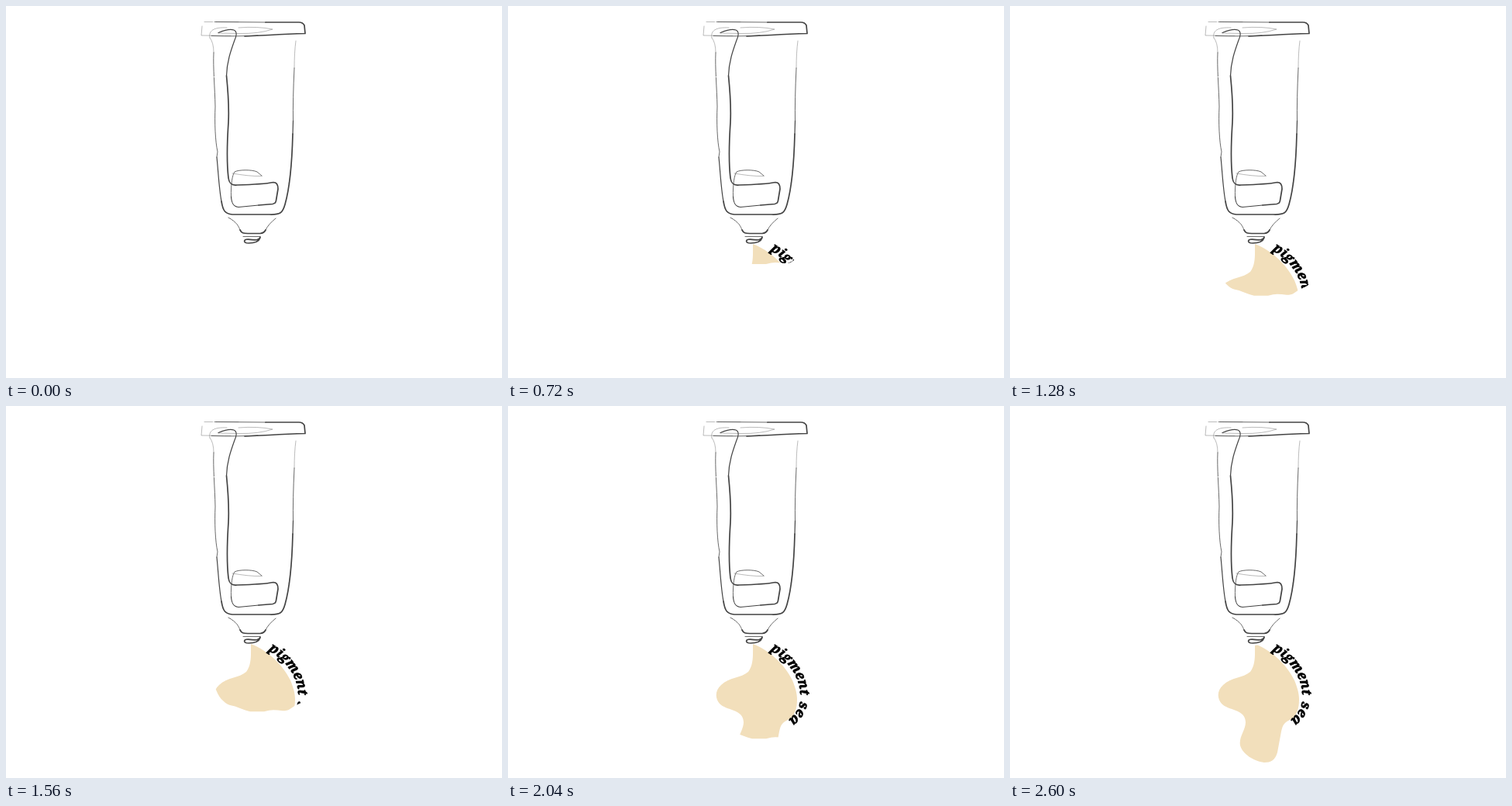
Animation of 640 by 480 pixels, one loop 2640 ms. Source, as an HTML page:

```html
<!DOCTYPE html>
<html lang="en">
<head>
<meta charset="utf-8">
<title>Tube</title>
<style>
  html, body { margin: 0; width: 100%; height: 100%; overflow: hidden; background: #fff; }
  svg { display: block; }
  .line { fill: none; stroke: #444; stroke-linecap: round; stroke-linejoin: round; filter: url(#chalk); }
  .faint { stroke-width: .5; stroke: #777; }
  .thin { stroke-width: .8; }
  .mid { stroke-width: 1.2; }
  .bold { stroke-width: 1.7; }
  text { font: italic 900 17.5px "Noto Serif", "DejaVu Serif", serif; word-spacing: 3px; stroke: #000; stroke-width: .7; }
</style>
</head>
<body>
<svg width="640" height="480" viewBox="0 0 640 480">
  <defs>
    <path id="arc" d="M338.500 315.500C358 326 376.500 348 377 371S371 396 358 409L346 419"/>
    <!-- wavy front whose lowest point is y = 0 -->
    <clipPath id="front">
      <path id="wave" d="M262-161V-40L271-28Q275-18 280-14Q285-9 290-8Q296-7 300-5Q310-1 315 0H333Q340-2 345-2T357-1Q363-1 366-3L372-7L384-13L394-24V-176H335Q325-161 316-161Z"/>
    </clipPath>
    <!-- slightly ragged stroke edges -->
    <filter id="chalk" filterUnits="userSpaceOnUse" x="240" y="10" width="160" height="310" color-interpolation-filters="sRGB">
      <feTurbulence type="fractalNoise" baseFrequency=".3" numOctaves="2" seed="4"/>
      <feDisplacementMap in="SourceGraphic" scale="1.4" xChannelSelector="R" yChannelSelector="G"/>
    </filter>
  </defs>

  <g class="line">
    <!-- cap -->
    <path class="faint" d="M256 20.500H300M253 26L252 38L290 38.500"/>
    <path class="thin" d="M270 20.500L335 21M265 38.500Q300 39.500 325 38"/>
    <path class="bold" d="M335 21H378Q383 21 385 25L386 35.500Q365 36 340 37.500L308 39"/>
    <path class="faint" d="M263 41C261 32 268 27 285 28M300 28Q325 26 344 30Q326 36 300 35.500L274 35"/>

    <!-- body -->
    <path class="faint" d="M263 41Q268 47 268 60M374 45Q372 60 372 80"/>
    <path class="thin" d="M268 60C267 80 269.500 105 270 130C269 150 270 175 273 188L272 195M372 80Q370 120 370.500 150"/>
    <path class="mid" d="M272 195C274 215 275 237 278 252M370 165L370.500 148"/>
    <path class="bold" d="M278 252C280 265 283 268 292 269H340C354 269.500 357 267 360 256C366 235 369 205 370 165"/>

    <!-- inner ribbon and label -->
    <path class="mid" d="M274 34.500C280 32 288 29 294 31C299 33 297 40 295 44C290 58 285 72 284.500 90"/>
    <path class="bold" d="M284.500 90C287 115 288 130 287 150C285 180 285 205 287 222C288 229 291 232 298 231C315 230.500 335 229.500 345 227.500C350 227.500 351 231 351 236L348.500 251Q348 255 344 255.500L326 257"/>
    <path class="mid" d="M326 257L300 259.500C293 259 291 254 290.500 246"/>
    <path class="thin" d="M290.500 246C290 230 292 218 295 214C300 211 318 211 324 214L330 219"/>
    <path class="faint" d="M330 219.500C318 220 304 218 292 216"/>

    <!-- neck and nozzle -->
    <path class="thin" d="M287 273C298 279 300 284 302 289M335 289Q338 282 348 274"/>
    <path class="bold" d="M302 289C304 293 306 293.500 312 293.500H328Q333 293 335 289"/>
    <path class="thin" d="M306 297.500H328"/>
    <path class="bold" d="M328 298C327 303 320 302 312 301C306 301 306 306 313 306C320 306 326 305 328 299"/>
  </g>

  <g clip-path="url(#front)">
    <path fill="#f2dfbb" d="M316 307C339 316 358 335 367 354C371 364 373 371 373 379C373 390 370 400 363 404C354 408 352 411 350 420L345 447C342 457 337 460 328 460C314 458 300 449 297 438C295 427 304 418 304 408C304 391 281 393 273 384C267 377 267 367 275 360C285 350 301 351 310 343C317 334 316 322 316 307Z"/>
    <text><textPath href="#arc">pigment sea</textPath></text>
  </g>
</svg>
<script>
  const LOOP = 2640, START = 400, STEP = 40;
  const wave = document.getElementById("wave");

  function draw() {
    const t = Math.floor(performance.now() % LOOP / STEP) * STEP;
    const y = t < START ? 0 : 309.7 + (t - START) * 0.0729;
    wave.setAttribute("transform", `translate(0 ${y})`);
    requestAnimationFrame(draw);
  }
  draw();
</script>
</body>
</html>
```
